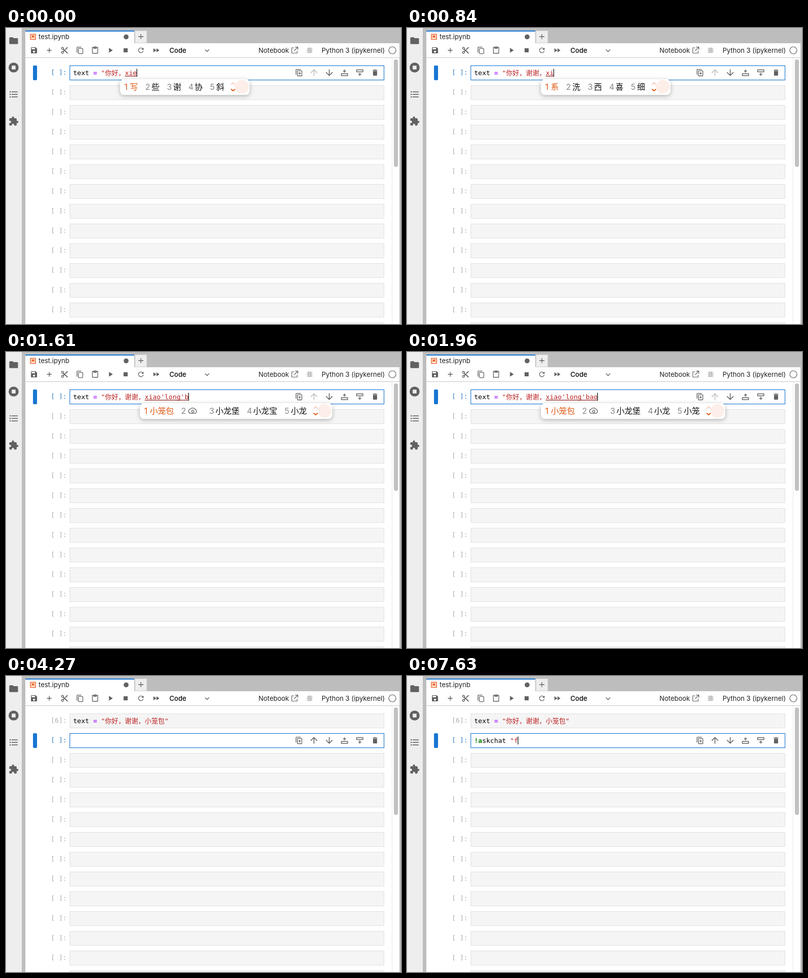
Recreate the animation shown at these times as an HTML page. Size 776 by 584 pixels, loop 8000 ms.

```html
<!DOCTYPE html>
<html lang="zh-CN">
<head>
<meta charset="utf-8">
<title>Notebook typing</title>
<style>
html, body { margin: 0; width: 100%; height: 100%; overflow: hidden; background: #fff; }
svg { display: block; }
text { white-space: pre; }
.ui { font: 13px Inter, "Liberation Sans", sans-serif; fill: #1f1f1f; }
.code { font: 13px "DejaVu Sans Mono", "Noto Sans CJK SC", "Noto Sans CJK", monospace; }
.ime { font: 15.8px Inter, "Noto Sans CJK SC", "Noto Sans CJK", sans-serif; }
.pop { filter: drop-shadow(0 2px 4px rgba(0, 0, 0, .28)); }
.str { fill: #ba2121; }
.op { fill: #a2f; font-weight: bold; }
.magic { fill: #008000; font-weight: bold; }
</style>
</head>
<body>
<svg id="stage" width="776" height="584" viewBox="0 0 776 584"></svg>
<script>
const LOOP = 8000, GREY = '#616161', BLUE = '#1976d2', CHAR = 7.826, WIDE = 13, TEXT_X = 132;

const rect = (x, y, w, h, fill, more = '') =>
  `<rect x="${x}" y="${y}" width="${w}" height="${h}" fill="${fill}" ${more}/>`;
const line = (d, color = GREY, w = 1.4) =>
  `<path d="${d}" fill="none" stroke="${color}" stroke-width="${w}"/>`;
const dot = (x, y, r, fill, more = '') => `<circle cx="${x}" cy="${y}" r="${r}" fill="${fill}" ${more}/>`;
const label = (x, y, s, cls, more = '') => `<text x="${x}" y="${y}" class="${cls}" ${more}>${s}</text>`;
const icon = (d, x, y, size = 16, box = 24) =>
  `<path transform="translate(${x - size / 2} ${y - size / 2}) scale(${size / box})" fill="${GREY}" d="${d}"/>`;
const span = (cls, s) => `<tspan class="${cls}">${s}</tspan>`;
const width = s => [...s].reduce((w, c) => w + (c > '\u2000' ? WIDE : CHAR), 0);
const rowY = i => 74 + 39 * i;

function sidebar() {
  const bullets = [126, 131, 136].map(y => dot(8.3, y, 1.3, GREY) + rect(11, y - .8, 12, 1.6, GREY));
  return rect(0, 0, 31, 584, '#eee') +
    icon('M10 4H4c-1.1 0-2 .9-2 2v12c0 1.1.9 2 2 2h16c1.1 0 2-.9 2-2V8c0-1.1-.9-2-2-2h-8z', 15, 25, 20.5) +
    dot(15, 78, 9.8, GREY) + rect(11.2, 74.2, 7.6, 7.6, '#eee', 'rx=".7"') + bullets.join('') +
    icon('M20.5 11H19V7c0-1.1-.9-2-2-2h-4V3.5a2.5 2.5 0 0 0-5 0V5H4c-1.1 0-2 .9-2 2v3.8h1.5a2.7 2.7 0 0 1 0 5.4H2V20c0 1.1.9 2 2 2h3.8v-1.5a2.7 2.7 0 0 1 5.4 0V22H17c1.1 0 2-.9 2-2v-4h1.5a2.5 2.5 0 0 0 0-5z', 15, 184, 20.5);
}

function tabs() {
  return rect(38, 5, 214, 26, '#fff') + rect(38, 5, 214, 2, BLUE) +
    rect(48, 12.5, 10, 10, 'none', 'stroke="#ef6c32" stroke-width="1.6"') +
    `<path d="M50.3 14.5h5.4v6l-2.7-2.2-2.7 2.2z" fill="#ef6c32"/>` +
    label(64, 22, 'test.ipynb', 'ui') + dot(236, 17.5, 4.8, GREY) +
    rect(253.5, 5.5, 23, 24, '#eee', 'stroke="#d0d0d0"') + line('M260 17h10M265 12v10', GREY, 1.3);
}

function toolbar() {
  const y = 44, bug = '#bdbdbd';
  return icon('M17 3H5c-1.1 0-2 .9-2 2v14c0 1.1.9 2 2 2h14c1.1 0 2-.9 2-2V7zm-5 16a3 3 0 1 1 0-6 3 3 0 0 1 0 6zm3-10H5V5h10z', 55, y) +
    icon('M19 13h-6v6h-2v-6H5v-2h6V5h2v6h6z', 85, y) +
    icon('M9.64 7.64A4 4 0 1 0 7.64 9.64L10 12l-2.36 2.36a4 4 0 1 0 2 2L12 14l7 7h3v-1zM6 8a2 2 0 1 1 0-4 2 2 0 0 1 0 4zm0 12a2 2 0 1 1 0-4 2 2 0 0 1 0 4zM19 3l-6 6 2 2 7-7V3z', 115, y) +
    line('M139.5 48.5V38.6q0-1 1-1H148') + rect(142.2, 40.4, 8.6, 10.2, 'none', `rx="1" stroke="${GREY}" stroke-width="1.3"`) +
    icon('M19 2h-4.2a3 3 0 0 0-5.6 0H5c-1.1 0-2 .9-2 2v16c0 1.1.9 2 2 2h14c1.1 0 2-.9 2-2V4c0-1.1-.9-2-2-2zm-7 0a1 1 0 1 1 0 2 1 1 0 0 1 0-2zm7 18H5V4h2v3h10V4h2z', 175, y) +
    icon('M8 5v14l11-7z', 205, y) + icon('M6 6h12v12H6z', 235, y) +
    icon('M9 13.5a4.5 4.5 0 1 1 3.17-7.67L10 8h5V3l-1.76 1.76A6 6 0 1 0 14.9 10h-1.52A4.5 4.5 0 0 1 9 13.5z', 265, y, 16, 18) +
    icon('M4 18l8.5-6L4 6zm9-12v12l8.5-6z', 295, y) +
    label(321, 48.7, 'Code', 'ui', 'style="font-weight:500;fill:#000"') +
    line('M391 42.5l4 4 4-4') + label(496, 48.7, 'Notebook', 'ui') +
    line('M566 39h-4.5v10.500h10.500V45M568 37.700h5.300V43M573 38l-7 7', GREY, 1.2) +
    `<ellipse cx="596.5" cy="44.500" rx="3.800" ry="5" fill="${bug}"/>` +
    line('M591 41h11M590.500 44.500h12M591 48h11M593.500 38l2 2M599.500 38l-2 2', bug, 1.4) +
    line('M595 43h3M595 46h3', '#fff', 1) +
    label(620, 48.7, 'Python 3 (ipykernel)', 'ui') + rect(38, 58, 735, 1, '#c4c4c4');
}

function cellTools(row) {
  const up = row ? GREY : '#bdbdbd';
  const tray = (x, y) => rect(x - 6.3, y, 12.6, 4, 'none', `rx=".6" stroke="${GREY}" stroke-width="1.4"`);
  return `<g transform="translate(0 ${rowY(row) + 14})">` +
    line('M569.700 4V-5.300q0-1 1-1H579', GREY, 1.3) +
    rect(572.500, -3.700, 8.700, 10.200, 'none', `rx=".8" stroke="${GREY}" stroke-width="1.3"`) +
    line('M574.300 1.400h5M576.800-1.100v5', GREY, 1.200) +
    line('M605 6.500V-5.500M598.700.600l6.300-6.300 6.300 6.300', up, 1.500) +
    line('M635-6.500V5.500M628.700-.600l6.300 6.300 6.300-6.300', GREY, 1.500) +
    tray(665, 2) + line('M665-6v6M662-3h6') +
    tray(695, -5.500) + line('M695 .5v6M692 3.500h6') +
    icon('M6 19c0 1.100.9 2 2 2h8c1.100 0 2-.9 2-2V7H6zM19 4h-3.500l-1-1h-5l-1 1H5v2h14z', 725, 0) + '</g>';
}

function cell(row, active, editing, mark) {
  const y = rowY(row);
  return (active ? rect(53, y, 8, 29, BLUE, 'rx="2"') : '') +
    label(88, y + 18, `[${mark}]:`, 'code', `fill="${active ? '#307fc1' : '#adadad'}"`) +
    rect(125.5, y + .5, 617, 28, editing ? '#fff' : '#f5f5f5', `stroke="${editing ? BLUE : '#e0e0e0'}"`) +
    (editing ? rect(125, y, 618, 29, 'none', 'stroke="#1976d2" stroke-opacity=".25"') : '') +
    (active ? cellTools(row) : '');
}

const caret = (x, row) => rect(x - .6, rowY(row) + 6.5, 1.2, 15.5, '#000');

// Candidate window; '@' stands for a pending cloud result.
function popup(left, words) {
  let x = left + 8.3, items = '';
  words.split(' ').forEach((word, i) => {
    const color = i ? '#111' : '#e0560f', wordX = x + (i ? 12.3 : 11);
    items += label(x, 122.3, i + 1, 'ime', `fill="${i ? '#888' : color}"`);
    items += word === '@'
      ? line(`M${wordX + 6} 121h8.500a4 4 0 0 0 1-7.600a6 5 0 0 0-10.500-.500a4.200 4.200 0 0 0 1 8.100z`, '#777', 1.5) +
        dot(wordX + 10.5, 117, 2.2, 'none', 'stroke="#777" stroke-width="1.400"')
      : label(wordX, 122.3, word, 'ime', `fill="${color}"`);
    x += (i ? 26.6 : 25.3) + 15.8 * (word === '@' ? 1.8 : word.length);
  });
  const w = x + 35.5 - left, mid = x + 3;
  return `<g class="pop">${rect(left, 101, w, 31, '#fff', 'rx="8"')}</g>` +
    dot(left + w - 15, 116, 13.5, '#fdeee9') + items +
    line(`M${mid - 4} 111.5l4-3.500 4 3.500`, '#f6bfa5', 1.6) +
    line(`M${mid - 4} 120.500l4 3.500 4-3.500`, '#e0560f', 1.8);
}

// time, committed string, pinyin being composed, candidates
const first = [
  [0, '你好，', 'xie', '写 些 谢 协 斜'],
  [70, '你好，', "xie'x", '谢谢 @ 谢谢你 谢谢大家 谢谢老师'],
  [210, '你好，', "xie'xie", '谢谢 @ 谢谢您 谢谢老师 谢谢大家'],
  [420, '你好，谢谢'],
  [630, '你好，谢谢，'],
  [770, '你好，谢谢，', 'x', '想 下 行 像 小'],
  [840, '你好，谢谢，', 'xi', '系 洗 西 喜 细'],
  [910, '你好，谢谢，', 'xia', '下 吓 夏 瞎 虾'],
  [980, '你好，谢谢，', 'xiao', '小 笑 校 效 消'],
  [1190, '你好，谢谢，', "xiao'l", '效率 小了 小龙 小笼 小拉'],
  [1400, '你好，谢谢，', "xiao'lo", '小楼 小龙 小笼 小咯 小喽'],
  [1470, '你好，谢谢，', "xiao'lon", '小龙 小笼 小隆 小珑 小聋'],
  [1540, '你好，谢谢，', "xiao'long", '小龙 小笼 小隆 小珑 小聋'],
  [1610, '你好，谢谢，', "xiao'long'b", '小笼包 @ 小龙堡 小龙宝 小龙'],
  [1820, '你好，谢谢，', "xiao'long'ba", '小笼包 @ 小龙坝 小龙吧 小龙'],
  [1890, '你好，谢谢，', "xiao'long'bao", '小笼包 @ 小龙堡 小龙宝 小龙'],
  [1960, '你好，谢谢，', "xiao'long'bao", '小笼包 @ 小龙堡 小龙 小笼'],
  [2030, '你好，谢谢，小笼包'],
  [2800, '你好，谢谢，小笼包"']
];
const second = [
  [0, ''], [4690, '!'], [5180, '!a'], [5460, '!as'], [5880, '!a'], [6020, '!as'], [6090, '!ask'],
  [6300, '!askc'], [6370, '!askch'], [6580, '!askcha'], [6650, '!askchat'], [6790, '!askchat '],
  [7140, '!askchat "'], [7630, '!askchat "f']
];
const at = (steps, t) => steps.filter(s => s[0] <= t).pop();
const within = (t, a, b) => t >= a && t < b;

function draw(t) {
  const ran = t >= 3220, busy = within(t, 3220, 3290), editing = t >= 3570;
  const [, done, pinyin = '', words] = at(first, t);
  const start = TEXT_X + width('text = "' + done), end = start + width(pinyin);
  let out = cell(0, !ran, !ran, busy ? '*' : ran ? 6 : ' ') + cell(1, ran, editing, ' ');
  out += label(TEXT_X, 92.5, 'text ' + span('op', '=') + ' ' + span('str', '"' + done + pinyin), 'code');
  if (pinyin) out += rect(start, 94.4, end - start, 1.2, '#8c1515');
  if (!ran && !within(t, 2660, 2800)) out += caret(end, 0);

  const typed = at(second, t)[1];
  out += label(TEXT_X, 131.5, span('magic', typed.slice(0, 2)) + typed.slice(2, 9) + span('str', typed.slice(9)), 'code');
  if (editing && !within(t, 4270, 4900)) out += caret(TEXT_X + width(typed), 1);
  if (words) out += popup(start - 9.5, words);
  return out + dot(759, 44, 7, busy ? GREY : '#fff', `stroke="${GREY}" stroke-width="1.2"`);
}

const stage = document.getElementById('stage');
let rows = '';
for (let i = 2; i < 14; i++) rows += cell(i, false, false, ' ');
stage.innerHTML = rect(0, 0, 776, 584, '#bdbdbd') + rect(38, 30, 735, 554, '#fff') + sidebar() + tabs() + toolbar() +
  rect(758, 59, 1, 525, '#e8e8e8') + rect(762, 62, 8, 212, '#c1c1c1', 'rx="4"') + rows + '<g id="live"></g>';
const live = document.getElementById('live');
const began = performance.now();
let shown = '';
function tick() {
  const next = draw((performance.now() - began) % LOOP);
  if (next !== shown) live.innerHTML = shown = next;
  requestAnimationFrame(tick);
}
tick();
</script>
</body>
</html>
```
